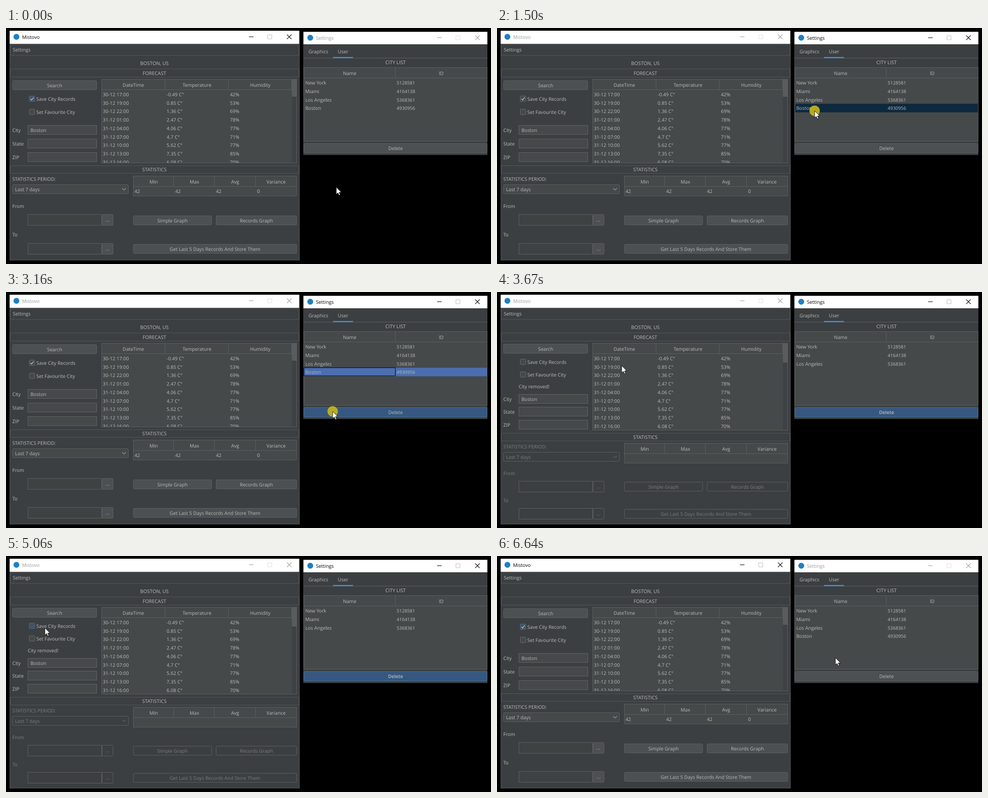
Write an HTML page that moves like this. It is 1072 px wide and 522 px high and loops after 7.43 s.

```html
<!DOCTYPE html>
<html lang="en">
<head>
<meta charset="utf-8">
<title>Weather desk</title>
<style>
html, body { margin: 0; width: 100%; height: 100%; overflow: hidden; background: #000; }
svg { display: block; width: 1072px; height: 522px; }
text { font: 10.6px "Open Sans", "Noto Sans", sans-serif; fill: #bbb; white-space: pre; text-rendering: geometricPrecision; }
.mid { text-anchor: middle; }
.caps { font-size: 10.8px; text-anchor: middle; }
.id { font-size: 10.2px; }
.dim { fill: #7b7d7e; }
.bold { font-weight: 600; text-anchor: middle; }
.dark { fill: #000; }
.faded { fill: #999; }
</style>
</head>
<body>
<svg id="stage" viewBox="0 0 1072 522"></svg>
<script>
const LOOP = 7430;
const BG = '#3c3f41', FIELD = '#45494a', BUTTON = '#4c5052', EDGE = '#5e6060', LINE = '#555859', BLUE = '#466d94';
const stage = document.getElementById('stage');

// Markup helpers; boxes take left, top, right, bottom.
const fill = (x, y, x2, y2, color) =>
  `<rect x="${x}" y="${y}" width="${x2 - x}" height="${y2 - y}" fill="${color}"/>`;
const box = (x, y, x2, y2, color, edge = EDGE, r = 0) =>
  `<rect x="${x + .5}" y="${y + .5}" width="${x2 - x - 1}" height="${y2 - y - 1}" rx="${r}" fill="${color}" stroke="${edge}"/>`;
const path = (d, color, w = 1) => `<path d="${d}" fill="none" stroke="${color}" stroke-width="${w}"/>`;
const text = (x, y, s, cls = '') => `<text x="${x}" y="${y}" class="${cls}">${s}</text>`;
const group = (id, body) => `<g id="${id}">${body}</g>`;
const button = (x, y, x2, y2, label, base, off) =>
  box(x, y, x2, y2, off ? BG : BUTTON, EDGE, 2) + text((x + x2) / 2, base, label, off ? 'mid dim' : 'mid');
const check = (x, y) => path(`M${x + 3} ${y + 6.5}l2.6 3 4.6-6`, '#b4b6b8', 1.6);
const bar = (y, y2, label, base) => box(9, y, 648, y2, BG, LINE, 1) + text(328, base, label, 'caps');

function titleBar(x, y, x2, y2, name, active) {
  const mid = Math.floor((y + y2) / 2) - .5, ink = active ? '#111' : '#a3a3a3';
  return fill(x, y, x2, y2, '#fff') +
    `<circle cx="${x + 15}" cy="${mid}" r="6.5" fill="#1d7fc4"/>` +
    text(x + 27.5, mid + 4, name, active ? 'dark' : 'faded') +
    path(`M${x2 - 111} ${mid}h10`, ink, 1.2) +
    path(`M${x2 - 69.5} ${mid - 4.5}h9v9h-9z`, active ? '#bbb' : '#ddd') +
    path(`M${x2 - 27} ${mid - 5}l10 10m0-10l-10 10`, ink, 1.2);
}

function forecast(bottom, thumb, id) {
  const rows = [
    ['30-12 17:00', '-0.49', 42], ['30-12 19:00', '0.85', 53], ['30-12 22:00', '1.36', 69],
    ['31-12 01:00', '2.47', 78], ['31-12 04:00', '4.06', 77], ['31-12 07:00', '4.7', 71],
    ['31-12 10:00', '5.62', 77], ['31-12 13:00', '7.35', 85], ['31-12 16:00', '6.08', 70]
  ];
  const cells = rows.map(([date, temp, hum], i) => {
    const y = 151 + i * 18.72;
    return text(214, y, date) + text(355, y, temp + ' C°') + text(495, y, hum + '%');
  }).join('');
  return box(211, 113, 643, bottom, FIELD) +
    fill(632, 114, 642, bottom - 1, '#3f4244') + fill(632, 114, 642, thumb, '#595b5d') +
    path('M211 136.5H632M351.5 114V136M491.5 114V136M631.5 114V136', EDGE) +
    text(281.5, 130, 'DateTime', 'mid') + text(422, 130, 'Temperature', 'mid') + text(562, 130, 'Humidity', 'mid') +
    `<clipPath id="${id}"><path d="M211 137H632V${bottom - 1}H211z"/></clipPath><g clip-path="url(#${id})">${cells}</g>`;
}

function statsTable(y, values) {
  const cols = [[326.5, 284, 'Min'], [416.5, 374, 'Max'], [506.5, 464, 'Avg'], [597, 555, 'Variance']];
  return box(281, y, 643, y + 45, FIELD) +
    path(`M281 ${y + 23.5}H643M370.5 ${y}v23M460.5 ${y}v23M551.5 ${y}v23`, EDGE) +
    cols.map(([mid, left, name], i) =>
      text(mid, y + 16.5, name, 'mid') + (values ? text(left, y + 37.5, values[i]) : '')).join('');
}

// The main panel, either with a saved city or after its removal.
function panel(gone) {
  const at = (saved, removed) => gone ? removed : saved;
  const key = at('A', 'B'), dim = at('', 'dim');
  const save = at(150, 148), fav = at(179, 176);
  const field = (name, y, value = '') =>
    text(14, y + 14.5, name) + box(48, y, 201, y + 21, FIELD, '#646464') + text(54, y + 14.5, value);
  const dateField = (name, base, y) =>
    text(14, base, name, dim) + box(48, y, 212, y + 25, at('#3f4243', BG), EDGE) +
    button(212, y, 237, y + 25, '...', y + 16, gone);
  const stat = at(304, 312), combo = at(346, 354), graph = at(415, 420), store = at(478, 480);
  return button(14, at(116, 115), 201, at(137, 136), 'Search', at(131, 130)) +
    box(51, save, 64, save + 13, FIELD, '#6b6b6b', 1) +
    group('hover' + key, box(51, save, 64, save + 13, '#43525f', BLUE, 1)) +
    group('check' + key, check(51, save)) + text(67, save + 11, 'Save City Records') +
    box(51, fav, 64, fav + 13, FIELD, '#6b6b6b', 1) +
    (gone ? group('hoverFav', box(51, fav, 64, fav + 13, '#43525f', BLUE, 1)) : '') +
    text(67, fav + 11, 'Set Favourite City') +
    (gone ? text(48, 213, 'City removed!') : '') +
    field('City', at(215, 226), 'Boston') + field('State', at(245, 254)) + field('ZIP', at(275, 283)) +
    forecast(at(299, 306), at(152, 156), 'clip' + key) +
    bar(stat, stat + 18, 'STATISTICS', stat + 13) +
    text(14, at(338, 346), 'STATISTICS PERIOD:', dim) +
    box(14, combo, 271, combo + 21, at(FIELD, BG), EDGE, 2) + text(20, combo + 14.5, 'Last 7 days', dim) +
    path(`M257 ${combo + 8.5}l4 4 4-4`, at('#9a9da0', '#606365'), 1.2) +
    statsTable(at(327, 334), gone ? null : [42, 42, 42, 0]) +
    dateField('From', at(398, 405), at(412, 418)) + dateField('To', at(461, 465), at(476, 478)) +
    button(281, graph, 455, graph + 21, 'Simple Graph', graph + 14.5, gone) +
    button(464, graph, 643, graph + 21, 'Records Graph', graph + 14.5, gone) +
    button(281, store, 643, store + 21, 'Get Last 5 Days Records And Store Them', store + 14.5, gone);
}

const cityRow = (name, id, i) => text(661.5, 125 + i * 18.75, name) + text(863.5, 125 + i * 18.75, id, 'id');

const mainWindow = box(8, 6, 649, 514, BG, LINE) +
  group('mainOn', titleBar(8, 6, 648, 35, 'Mistovo', true)) +
  group('mainOff', titleBar(8, 6, 648, 35, 'Mistovo', false)) +
  box(9, 36, 648, 61, BG, LINE, 1) + text(15, 52, 'Settings') +
  text(328, 82, 'BOSTON, US', 'caps') + bar(90, 109, 'FORECAST', 104) +
  group('saved', panel(false)) + group('removed', panel(true));

const settingsWindow = fill(657, 8.5, 1064, 281, BG) +
  group('setOn', titleBar(657.5, 8.5, 1064, 36, 'Settings', true)) +
  group('setOff', titleBar(657.5, 8.5, 1064, 36, 'Settings', false)) +
  text(690.5, 56, 'Graphics', 'mid') + text(745, 56, 'User', 'mid') +
  path('M657 66.5H1064', EDGE) + fill(723, 64, 767, 67, '#4a88c7') +
  text(861, 79.5, 'CITY LIST', 'caps') +
  box(658, 87, 1064, 251, FIELD) +
  group('rowDark', fill(659, 167.5, 1063, 186.5, '#0d293e')) +
  group('rowBlue', fill(659, 167.5, 1063, 186.5, '#4b6eaf') + box(658, 167, 861, 186, '#4b6eaf', '#000')) +
  group('tableFocus', box(658, 87, 1064, 251, 'none', BLUE)) +
  path('M658 110.5H1064M860.5 88V110', EDGE) +
  text(759.5, 104, 'Name', 'mid') + text(962, 104, 'ID', 'mid') +
  cityRow('New York', 5128581, 0) + cityRow('Miami', 4164138, 1) + cityRow('Los Angeles', 5368361, 2) +
  group('boston', cityRow('Boston', 4930956, 3)) +
  box(658, 255, 1064, 277, BUTTON, EDGE, 2) +
  group('delHover', box(658, 255, 1064, 277, '#55595b', EDGE, 2)) +
  group('delFocus', box(658, 255, 1064, 277, '#365880', '#4c708c', 2)) +
  group('delText', text(861, 270, 'Delete', 'mid')) +
  group('delBold', text(861, 270, 'Delete', 'bold'));

const pointer = group('pointer',
  group('click', '<circle r="11.5" fill="#c8b61e" opacity=".9"/>') +
  '<path d="M0 0V16L3.7 12.6L6.2 18.2L8.7 17.1L6.3 11.7H11.3Z" fill="#fff" stroke="#000" stroke-width=".9"/>');

stage.innerHTML = mainWindow + settingsWindow + pointer;

// Hard on/off switches: each part lists the spans in which it is seen.
const spans = {
  mainOn: [[0, 1500], [5160, LOOP]], mainOff: [[1500, 5160]],
  setOn: [[1500, 5160]], setOff: [[0, 1500], [5160, LOOP]],
  saved: [[0, 3210], [5390, LOOP]], removed: [[3210, 5390]],
  hoverA: [[0, 1500], [5390, LOOP]], hoverB: [[3930, 4470], [4960, 5390]],
  hoverFav: [[4470, 4560], [4860, 4960]], checkB: [[5160, 5390]],
  rowDark: [[1500, 1540]], rowBlue: [[1540, 3210]], tableFocus: [[1540, 3160]],
  boston: [[0, 3210], [5390, LOOP]],
  delHover: [[690, 765], [2060, 3160]], delFocus: [[3160, 5160]],
  delText: [[0, 3520], [5160, LOOP]], delBold: [[3520, 5160]],
  click: [[1500, 1580], [3160, 3310], [5160, 5240]]
};
const timing = { duration: LOOP, iterations: Infinity };
for (const [id, list] of Object.entries(spans)) {
  const seen = t => Number(list.some(([a, b]) => t >= a && t < b));
  const times = [...new Set([0, ...list.flat(), LOOP])];
  const frames = times.map(t => ({ offset: t / LOOP, opacity: seen(t), easing: 'steps(1, end)' }));
  document.getElementById(id).animate(frames, timing);
}

// Pointer stops: time, x, y, easing towards the next stop.
const HOLD = 'steps(1, end)';
const stops = [
  [0, 730, 352, HOLD], [380, 730, 352, 'ease-in-out'], [1070, 703, 185, HOLD],
  [1220, 703, 185, 'linear'], [1350, 702, 183, HOLD],
  [1810, 702, 183, 'ease-in-out'], [2190, 722, 264, HOLD],
  [3520, 722, 264, 'ease-in'], [3670, 277, 163, 'ease-out'], [3850, 130, 147, 'ease-out'], [4090, 90, 165, HOLD],
  [4370, 90, 165, 'ease-in-out'], [4710, 104, 231, 'ease-in-out'], [5060, 86, 159, HOLD],
  [5390, 86, 159, 'ease-in'], [5570, 102, 154, 'ease-in-out'], [6130, 747, 229, HOLD],
  [6640, 748, 225, HOLD], [LOOP, 748, 225, HOLD]
];
document.getElementById('pointer').animate(stops.map(([t, x, y, easing]) =>
  ({ offset: t / LOOP, transform: `translate(${x}px, ${y}px)`, easing })), timing);
</script>
</body>
</html>
```
